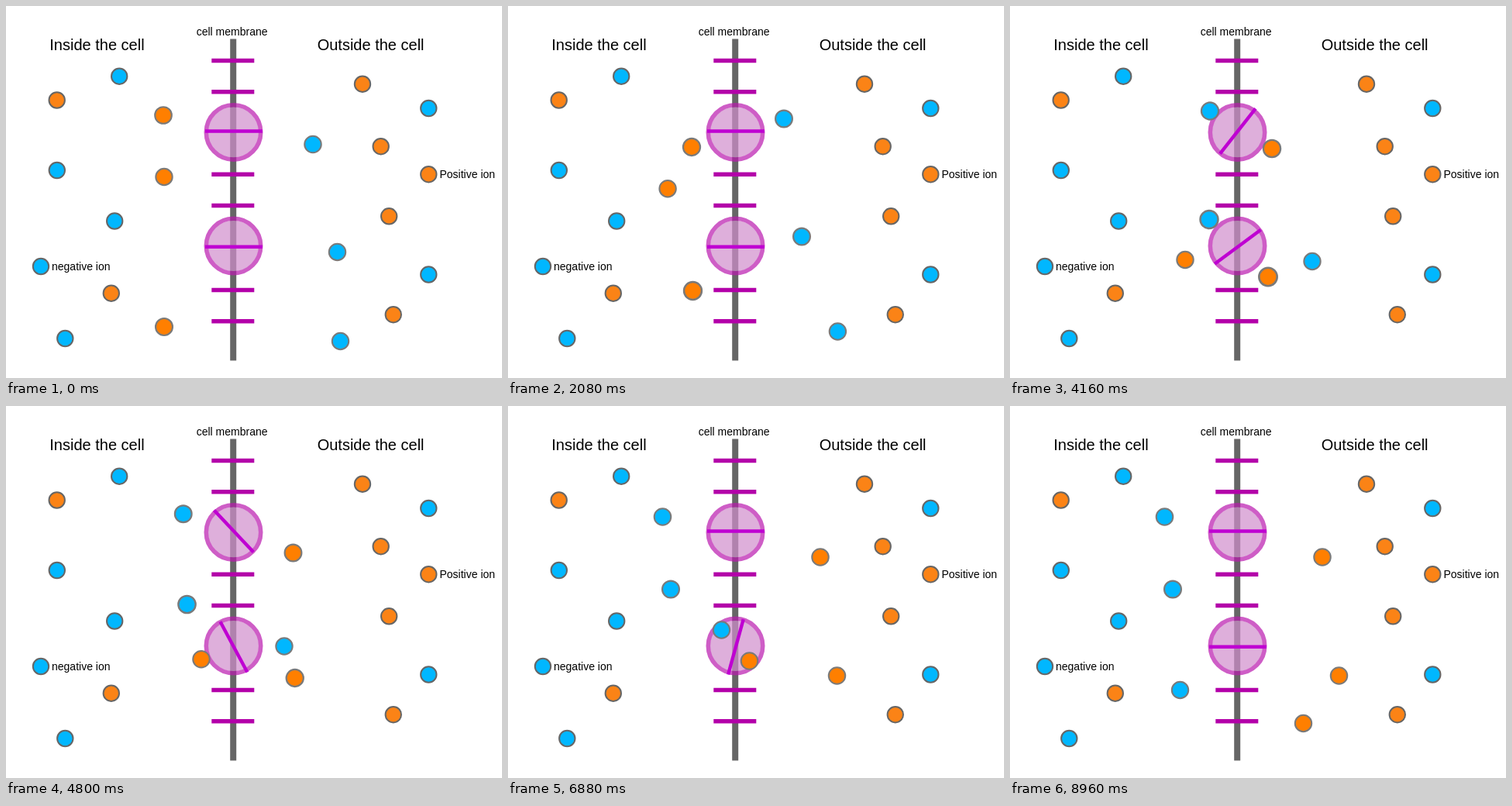
Animation, 640 px wide and 480 px high, one loop 10000 ms. Source, as an HTML page:

```html
<!DOCTYPE html>
<html lang="en">
<head>
<meta charset="utf-8">
<title>Ions crossing the cell membrane</title>
<style>
html, body { margin: 0; width: 100%; height: 100%; overflow: hidden; background: #fff; }
svg { display: block; width: 100%; height: 100%; }
text { font-family: "Liberation Sans", Arial, sans-serif; font-size: 14px; fill: #000; }
.title { font-size: 20px; }
.positive { fill: #fb8316; }
.negative { fill: #00b7ff; }
.moving.positive { fill: #ff7f00; }
.ion { stroke: #666; stroke-width: 2; }
.moving { stroke: #7a7a7a; }
</style>
</head>
<body>
<svg viewBox="0 0 640 480">
  <text class="title" x="56.3" y="57">Inside the cell</text>
  <text class="title" x="401.7" y="57">Outside the cell</text>
  <text x="245.7" y="38">cell membrane</text>
  <text x="59" y="340.5">negative ion</text>
  <text x="559.5" y="222">Positive ion</text>
  <path d="M293.2 42.5V457.5" stroke="#666" stroke-width="8"/>
  <g id="bars" stroke="#b300a9" stroke-width="5.5"></g>
  <g id="pumps"></g>
  <g id="ions"></g>
</svg>
<script>
const LOOP = 10000, STEP = 160, MEMBRANE = 293.5;
const $ = id => document.getElementById(id);
const clamp = (v, lo, hi) => Math.min(hi, Math.max(lo, v));

function add(parent, tag, attrs) {
  const el = document.createElementNS("http://www.w3.org/2000/svg", tag);
  for (const key in attrs) el.setAttribute(key, attrs[key]);
  return parent.appendChild(el);
}

function addIon(kind, x, y, extra = "") {
  return add($("ions"), "circle", { class: `ion ${kind} ${extra}`, cx: x, cy: y, r: 10.2 });
}

for (const top of [70.5, 217.3, 366.5])
  for (const y of [top, top + 40.2])
    add($("bars"), "path", { d: `M265.3 ${y}H320.3` });

function addPump(y, doorY) {
  const pump = add($("pumps"), "g", { opacity: 0.7 });
  add(pump, "circle", { cx: MEMBRANE, cy: y, r: 33, fill: "#d18ecd" });
  add(pump, "circle", { cx: MEMBRANE, cy: y, r: 35.2, fill: "none", stroke: "#ba1aaf", "stroke-width": 5.6 });
  const pivot = add($("pumps"), "g", { transform: `translate(${MEMBRANE + 0.4} ${doorY})` });
  return add(pivot, "path", { d: "M-37 0H37", stroke: "#bf00d2", "stroke-width": 4.4 });
}
const upperDoor = addPump(162.9, 161.5), lowerDoor = addPump(309.5, 310.8);

const resting = {
  positive: [[65.7, 121.5], [135.8, 370.7], [460, 100.7], [483.7, 181.2], [545.3, 217.2], [494.2, 271.3], [499.8, 398.2]],
  negative: [[146.2, 90.7], [65.8, 212], [140.2, 277.5], [45, 336], [76.3, 429], [545.3, 132], [545.3, 346.5]]
};
for (const kind in resting)
  for (const [x, y] of resting[kind]) addIon(kind, x, y);

// Ions reach their waypoints on shared beats; the last pair waits at the pump
const beats = [800, 2080, 3200, 4160, 5440, 5760];
const lateBeats = [1800, 3200, 4160, 5440, 6400, 8480];
const afterWait = t => t - clamp(t - 5440, 0, 480);

function addMover(kind, swell, late, ...points) {
  return { el: addIon(kind, 0, 0, "moving"), swell, late, points };
}
const movers = [
  addMover("positive", 0.8, false, [203, 141], [237, 182], [291, 181], [338, 184], [403, 195]),
  addMover("negative", 0.6, false, [396, 178.5], [356, 145.5], [301.5, 144], [258, 135.5], [199.5, 143]),
  addMover("positive", 1.7, false, [204, 414], [238.5, 367.5], [285, 327.5], [333, 349.5], [412.5, 352.5], [424.5, 348]),
  addMover("negative", 1.3, false, [427.5, 317.5], [379, 297.5], [304.5, 292.5], [257, 275.5], [210, 236.5]),
  addMover("positive", 0.1, true, [204, 220.5], [214.5, 296.5], [226, 327.5], [278, 326], [311.5, 329], [378.5, 409.5]),
  addMover("negative", 0, true, [431.5, 432.5], [401, 370], [390, 329.5], [328, 290.5], [275.5, 289], [219.5, 366.5])
];

function along(points, times, t) {
  const last = points.length - 1;
  const time = clamp(t, times[0], times[last]);
  const i = clamp(times.findIndex(end => end >= time), 1, last);
  const u = (time - times[i - 1]) / (times[i] - times[i - 1]);
  return points[i].map((v, k) => points[i - 1][k] + (v - points[i - 1][k]) * u);
}

function moveIon({ el, swell, late, points }, t) {
  const [x, y] = late ? along(points, lateBeats, afterWait(t)) : along(points, beats, t);
  const growth = swell * Math.exp(-(((x - MEMBRANE) / 70) ** 2));
  el.setAttribute("cx", x);
  el.setAttribute("cy", y);
  el.setAttribute("r", 10.7 + growth * 0.8);
  el.style.strokeWidth = 2 + growth * 0.5;
}

// A half turn: slow while the ions push, then quick
const pushed = (t, start) => clamp((t - start) * 0.0275 + Math.max(0, t - 4160) * 0.1, 0, 180);
const swung = (t, start) => clamp((t - start) * 0.0777, 0, 180);
const turn = (door, angle) => door.setAttribute("transform", `rotate(${-angle})`);

function draw(ms) {
  const t = Math.floor((ms % LOOP) / STEP) * STEP;
  for (const mover of movers) moveIon(mover, t);
  turn(upperDoor, pushed(t, 2280));
  turn(lowerDoor, pushed(t, 2830) + swung(t, 5920));
}

let start;
function tick(now) {
  start ??= now;
  draw(now - start);
  requestAnimationFrame(tick);
}
draw(0);
requestAnimationFrame(tick);
</script>
</body>
</html>
```
